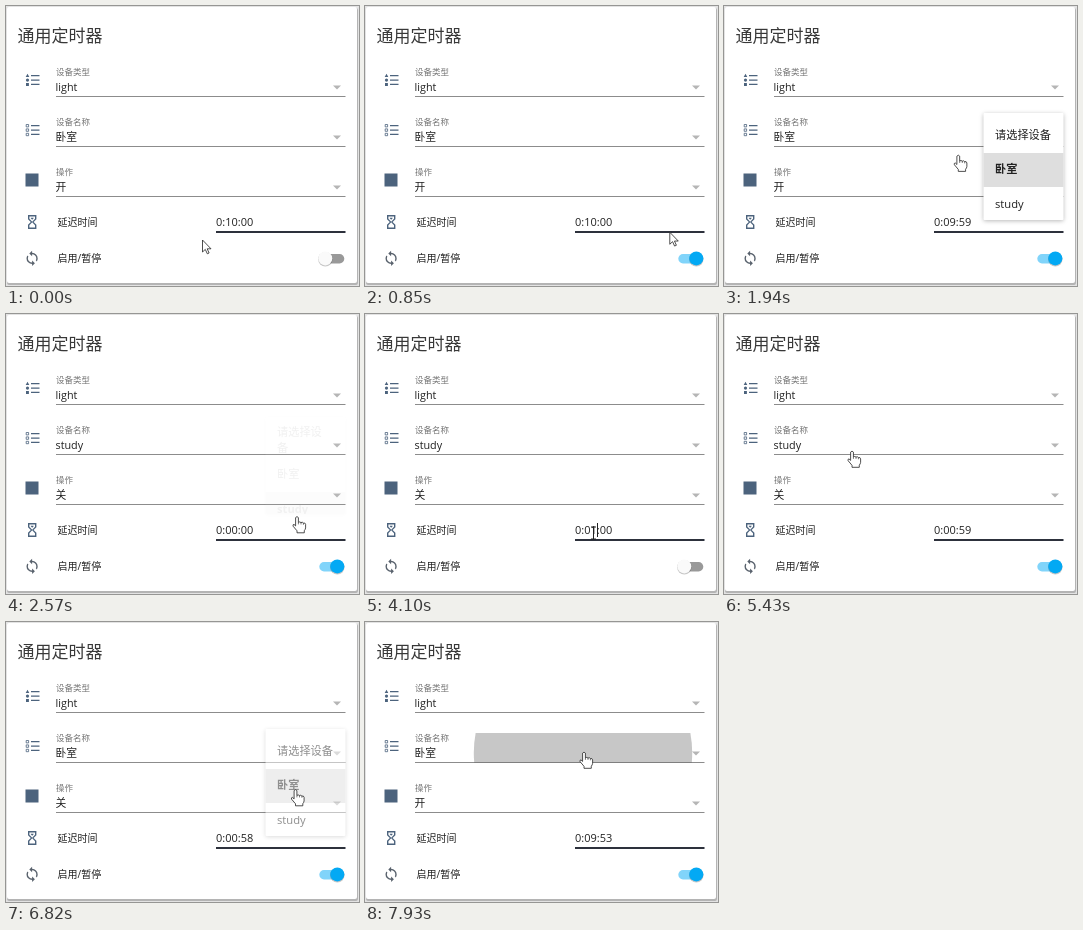
Recreate the animation shown at these times as an HTML page. Size 353 by 280 pixels, loop 8 s.

```html
<!DOCTYPE html>
<html lang="zh-CN">
<head>
<meta charset="utf-8">
<title>通用定时器</title>
<style>
html, body { margin: 0; width: 100%; height: 100%; overflow: hidden; background: #e9e9e9; }
svg { display: block; width: 353px; height: 280px; }
text { font-family: "Open Sans", "Noto Sans CJK SC", "Noto Sans CJK", sans-serif; font-size: 11px; fill: #212121; white-space: pre; }
.title { font-size: 17px; fill: #383838; }
.label { font-size: 8.5px; fill: #757575; }
.value { font-size: 10.8px; }
.name { font-size: 10px; }
.icon { fill: #4c637d; }
#menu { filter: drop-shadow(0 1px 2px rgba(0, 0, 0, .28)); }
#menu text { font-size: 11.2px; }
.ptr { stroke: #222; stroke-width: .8; stroke-linejoin: round; fill: #fff; }
</style>
</head>
<body>
<svg viewBox="0 0 353 280">
  <defs>
    <clipPath id="fieldClip"><rect x="50" y="111" width="289.5" height="29.5"/></clipPath>
    <clipPath id="menuClip"><rect id="menuCut" x="259.5" y="107" width="80" height="107"/></clipPath>
  </defs>
  <rect width="353" height="280" fill="#e3e3e3"/>
  <rect x="1" y="2" width="351" height="277" rx="2" fill="#b4b4b4"/>
  <rect x="1" y="1" width="350" height="276" rx="2" fill="#fff"/>
  <text class="title" x="11.5" y="36">通用定时器</text>

  <g id="rows"></g>
  <g class="icon">
    <g transform="translate(-.5 0)">
      <path d="M25.5 69h8.5v1.3h-8.5zM25.5 73.4h8.5v1.3h-8.5zM25.5 77.8h8.5v1.3h-8.5zM22 67.8l1.8 3.1h-3.6zM20.5 77h2.9v2.9h-2.9z"/>
      <circle cx="22" cy="74.1" r="1.6"/>
      <path d="M25.5 119h8.5v1.3h-8.5zM25.5 123.4h8.5v1.3h-8.5zM25.5 127.8h8.5v1.3h-8.5z"/>
      <path d="M20.7 118.5h2.4v2.4h-2.4zM20.7 122.9h2.4v2.4h-2.4zM20.7 127.3h2.4v2.4h-2.4z" fill="none" stroke="#4c637d" stroke-width=".8"/>
    </g>
    <rect x="19.5" y="167.5" width="13" height="13"/>
    <path transform="translate(17.8 207.6) scale(.7)" d="M6 2H18V8L14 12L18 16V22H6V16L10 12L6 8V2M16 16.5L12 12.5L8 16.5V20H16V16.5M12 11.5L16 7.5V4H8V7.5L12 11.5M10 6H14V6.75L12 8.75L10 6.75V6Z"/>
    <path transform="translate(17.7 244) scale(.7)" fill="#59626d" d="M12 18A6 6 0 0 1 6 12C6 11 6.25 10.03 6.7 9.2L5.24 7.74C4.46 8.97 4 10.43 4 12A8 8 0 0 0 12 20V23L16 19L12 15M12 4V1L8 5L12 9V6A6 6 0 0 1 18 12C18 13 17.75 13.97 17.3 14.8L18.76 16.26C19.54 15.03 20 13.57 20 12A8 8 0 0 0 12 4Z"/>
  </g>

  <g clip-path="url(#fieldClip)"><circle id="ripple" fill="#212121"/></g>
  <rect id="focusLine" y="139.4" height="1.8" fill="#03a9f4"/>

  <text class="name" x="51.5" y="219.5">延迟时间</text>
  <text class="name" x="51.5" y="255.5">启用/暂停</text>
  <rect x="210" y="225" width="129.5" height="2" fill="#2d313c"/>
  <rect id="mark" x="226" y="209" width="6.4" height="14" fill="#3390ff"/>
  <text x="210" y="220"><tspan id="head"></tspan><tspan id="digit"></tspan><tspan id="tail"></tspan></text>
  <rect id="caret" x="232" y="209" width="1" height="14" fill="#222"/>

  <g transform="translate(-.7 0)">
    <rect id="track" x="314" y="248" width="25" height="9.4" rx="4.7"/>
    <circle id="shade" cy="253.3" r="7.2" fill="#000" opacity=".22"/>
    <circle id="knob" cy="252.4" r="7"/>
  </g>

  <g id="menu">
    <rect id="sheet" x="259.5" y="107" width="80" height="107" rx="1" fill="#fff"/>
    <g clip-path="url(#menuClip)"><g id="items">
      <rect id="pick" x="259.5" width="80" height="34" fill="#000" opacity=".13"/>
      <text id="hint1" x="271" y="133"></text>
      <text id="hint2" x="271" y="150">备</text>
      <text id="opt1" x="271" y="167">卧室</text>
      <text id="opt2" x="271" y="201.5">study</text>
    </g></g>
  </g>

  <g id="cursor">
    <path id="A" class="ptr" d="M0 0V12L2.8 9.4 4.8 13.8 6.6 13 4.7 8.8H8.5Z"/>
    <g id="H" transform="translate(0 -.6)">
      <path class="ptr" d="M-1.4 1.2Q0-.8 1.4 1.2V6Q2.8 4.9 4 6.2 5.4 5.2 6.4 6.7 8.2 6 8.6 8V11.5Q8.4 13 7.3 14.3V16.4H0V14.4L-3.9 9.8Q-4.5 8-3 8L-1.4 9.5Z"/>
      <path d="M1.4 6V8M4 6.2V8M6.4 6.7V8.4" stroke="#222" stroke-width=".6"/>
    </g>
    <path id="I" d="M-2.5-6H2.5M0-6V6M-2.5 6H2.5" stroke="#222" fill="none"/>
  </g>
</svg>
<script>
const LOOP = 8000;
const $ = id => document.getElementById(id);
const set = (id, attrs) => { for (const k in attrs) $(id).setAttribute(k, attrs[k]); };
const show = (id, on) => set(id, { visibility: on ? "visible" : "hidden" });
const clamp = x => Math.min(1, Math.max(0, x));
const ease = x => x * x * (3 - 2 * x);
const ramp = (t, start, len) => clamp((t - start) / len);
const last = (list, t) => list.filter(e => e[0] <= t).pop();

$("rows").innerHTML = ["设备类型", "设备名称", "操作"].map((label, i) => {
  const y = 50 * i;
  return `<text class="label" id="label${i}" x="50" y="${69 + y}">${label}</text>
    <text class="value" id="value${i}" x="49.5" y="${85 + y}">light</text>
    <rect x="50" y="${90 + y}" width="289.5" height="1" fill="#8c8c8c"/>
    <path d="M327 ${79.6 + y}h8l-4 4z" fill="#b5b5b5"/>`;
}).join("");

// bursts of screen updates: start, end, count
const bursts = [[70, 450, 6], [600, 1380, 11], [1480, 2240, 11], [2320, 3020, 10],
  [3250, 3400, 3], [3570, 3570, 1], [4100, 4100, 1], [4270, 4730, 7], [4900, 5580, 10],
  [5910, 6670, 11], [6750, 7150, 6], [7300, 7300, 1], [7850, 7930, 2]];

function snap(t) {
  const b = last(bursts, t);
  if (!b) return 0;
  const [from, to, n] = b;
  if (n < 2 || t >= to) return to;
  const step = (to - from) / (n - 1);
  return from + step * Math.floor((t - from) / step + .2);
}

// pointer path: time, x, y, shape
const path = [[0, 196.5, 234, "A"], [10, 196.5, 234, "A"], [370, 322, 252, "H"], [440, 330, 254, "H"],
  [700, 330, 254, "A"], [1000, 270, 188, "H"], [1300, 213.5, 130, "H"], [1800, 213.5, 130, "H"],
  [2200, 291, 203, "H"], [2620, 291, 203, "I"], [3000, 232.5, 218, "I"], [3200, 232.5, 218, "I"],
  [3400, 228.5, 218, "I"], [3570, 228.5, 219, "I"], [4220, 228.5, 219, "I"], [4340, 250, 228, "A"],
  [4640, 322, 252, "H"], [4730, 329, 254, "H"], [5000, 329, 251, "A"], [5280, 195, 172, "H"],
  [5430, 128, 137.5, "H"], [5570, 118, 125, "H"], [6100, 118, 125, "H"], [6600, 289.5, 168, "H"],
  [6840, 289.5, 168, "H"], [7140, 219, 130.5, "H"], [LOOP, 219, 130.5, "H"]];

const rooms = [[0, "卧室"], [2320, "study"], [6750, "卧室"]];
const states = [[0, "开"], [2470, "关"], [6980, "开"]];
const clock = [[0, "0:10:00"], [1300, "0:09:59"], [2240, "0:09:58"], [2470, "0:00:00"], [4100, "0:01:00"],
  [5350, "0:00:59"], [6400, "0:00:58"], [6980, "0:09:54"], [7300, "0:09:53"]];
const presses = [[1366, 213.5], [5840, 118], [7780, 218]];
const menus = [[1560, 2365], [6050, 6730]];

function drawPointer(t) {
  const i = Math.max(0, path.findIndex(k => k[0] > t) - 1);
  const [t0, x0, y0, kind] = path[i], [t1, x1, y1] = path[i + 1];
  const p = ease(ramp(t, t0, t1 - t0));
  set("cursor", { transform: `translate(${x0 + (x1 - x0) * p} ${y0 + (y1 - y0) * p})` });
  for (const k of "AHI") show(k, k === kind);
}

function drawField(t) {
  const press = last(presses, t);
  const age = press ? t - press[0] : LOOP;
  set("ripple", {
    cx: press ? press[1] : 0, cy: 131,
    r: Math.min(300, age * .728),
    opacity: .25 * (1 - ramp(age, 150, 300))
  });
  const focused = age < 430 && press[0] < 7000;
  const half = focused ? 145 * ease(ramp(age, 0, 208)) : 0;
  set("focusLine", { x: 195 - half, width: 2 * half });
  $("label1").style.fill = focused ? "#03a9f4" : "";
}

function drawMenu(t, room) {
  const m = last(menus, t);
  const gone = !m || t > m[1] + 200;
  show("menu", !gone);
  if (gone) return;
  const [open, close] = m;
  const grow = ease(ramp(t, open, 260));
  const closing = t > close + 120;
  const wrap = closing || grow < .6;
  const extra = wrap ? 17 : 0;
  const top = closing ? 103 : 107;
  const height = closing ? 97 : 30 + 77 * grow;
  set("menu", { opacity: ramp(t, open, 200) * (1 - ramp(t, close, 200)) });
  for (const id of ["sheet", "menuCut"]) set(id, { y: top, height });
  set("items", { transform: `translate(0 ${closing ? -20 : 0})` });
  $("hint1").textContent = wrap ? "请选择设" : "请选择设备";
  set("hint1", { y: 133 + extra / 2 - (wrap ? 8 : 0) + (closing ? 8 : 0) });
  set("hint2", { y: 150 + (closing ? 8 : 0), opacity: wrap ? 1 : 0 });
  const first = room === "卧室";
  set("opt1", { y: 167 + extra, "font-weight": first ? 700 : 400 });
  set("opt2", { y: 201.5 + extra, "font-weight": first ? 400 : 700 });
  set("pick", { y: (first ? 147 : 181) + extra });
}

function drawSwitch(t) {
  const on = ramp(t, 560, 150) - ramp(t, 2830, 150) + ramp(t, 4860, 150);
  const p = ease(clamp(on));
  set("knob", { cx: 320 + 12 * p, fill: on > .3 ? "#03a9f4" : "#fafafa" });
  set("shade", { cx: 320 + 12 * p });
  set("track", { fill: on > .3 ? "#81d4fa" : "#999" });
}

function draw(now) {
  const t = snap(now % LOOP);
  const room = last(rooms, t)[1], time = last(clock, t)[1];
  $("value1").textContent = room;
  $("value2").textContent = last(states, t)[1];
  $("head").textContent = time.slice(0, 3);
  $("digit").textContent = time[3];
  $("tail").textContent = time.slice(4);
  const marked = t >= 3320 && t < 4100;
  show("mark", marked);
  $("digit").style.fill = marked ? "#fff" : "";
  show("caret", t >= 3250 && t < 3320 || t >= 4100 && t < 4600);
  drawField(t);
  drawSwitch(t);
  drawMenu(t, room);
  drawPointer(t);
}

const start = performance.now();
function tick() {
  draw(performance.now() - start);
  requestAnimationFrame(tick);
}
tick();
</script>
</body>
</html>
```
